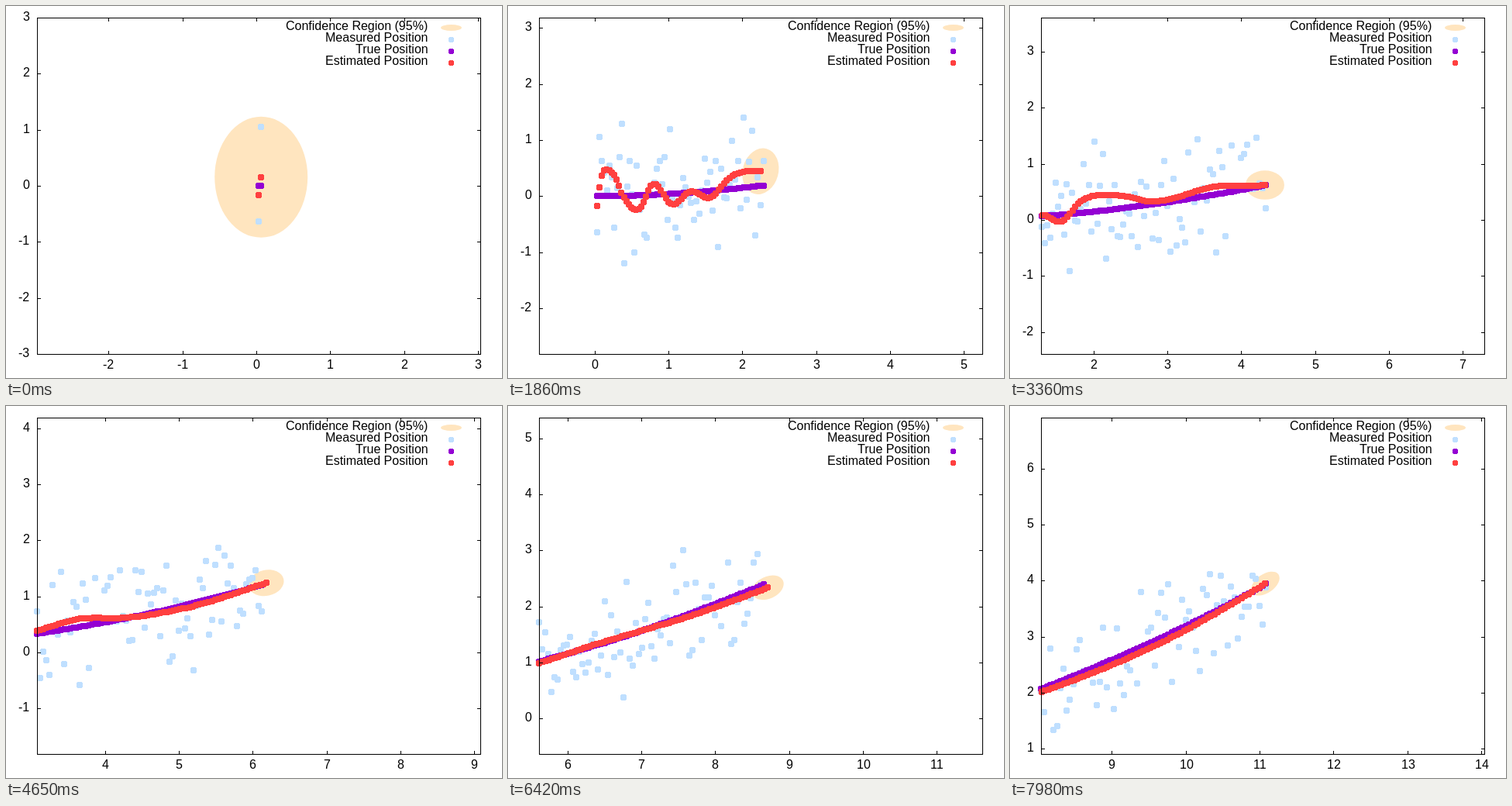
An HTML page with a canvas that plays this animation: 640 px wide and 480 px high, repeating every 8000 ms.

```html
<!DOCTYPE html>
<html lang="en">
<head>
<meta charset="utf-8">
<title>Position tracking</title>
<style>
  html, body { margin: 0; width: 100%; height: 100%; overflow: hidden; background: #fff; }
  canvas { display: block; }
</style>
</head>
<body>
<canvas id="plot" width="640" height="480"></canvas>
<script>
const ctx = document.getElementById('plot').getContext('2d');
const LOOP = 8000, STEP = 30, SAMPLES = 268;
const BOX = { left: 40, right: 612, top: 15, bottom: 449 };
const MID = { x: 326, y: 232 };
const UNIT = { x: 572 / 6, y: 434 / 6 };
const COLOR = { region: '#ffe5bf', measured: '#bfdfff', truth: '#9400d3', estimate: '#ff4040' };

// Cubic Hermite curve through unevenly spaced [time, value] knots
function smooth(...knots) {
  const last = knots.length - 1;
  const rise = i => (knots[i + 1][1] - knots[i][1]) / (knots[i + 1][0] - knots[i][0]);
  const slopes = knots.map(([t], i) => {
    if (i === 0) return rise(0);
    if (i === last) return rise(last - 1);
    const before = t - knots[i - 1][0], after = knots[i + 1][0] - t;
    return (rise(i - 1) * after + rise(i) * before) / (before + after);
  });
  return t => {
    let i = 0;
    while (i < last - 1 && t >= knots[i + 1][0]) i++;
    const [t0, v0] = knots[i], [t1, v1] = knots[i + 1];
    const h = t1 - t0, u = (t - t0) / h, w = 1 - u;
    return v0 * (1 + 2 * u) * w * w + v1 * u * u * (3 - 2 * u)
      + h * u * w * (slopes[i] * w - slopes[i + 1] * u);
  };
}

const trueX = smooth([0, .03], [36, 1.269], [85, 3.163], [112, 4.29],
  [155, 6.08], [214, 8.615], [266, 11.043], [290, 12.18]);
const trueY = k => k * k * (4.8 + .72 * (k / 266) ** 3) / 1e5;

// The estimate swings around the truth and settles; it also runs some samples ahead or behind
const error = smooth([0, -.17], [1, .16], [6, .42], [11, -.05], [17, -.24], [22, .18],
  [30, -.19], [37, .02], [44, -.12], [51, .2], [65, .23], [75, .06], [98, .14],
  [112, .01], [130, -.05], [163, .02], [200, -.06], [236, -.09], [266, .01]);
const lead = smooth([0, 0], [36, -.7], [85, -1], [112, -.3], [155, 1.4], [214, 1.2], [266, -.2]);

const radius = k => 17 + 61 / (1 + k / 17);
const ratio = k => 1.3 + .4 * (k / 266) ** 3;
const tilt = smooth([0, 90], [36, 80], [85, 96], [112, 180], [155, 192], [214, 205], [266, 215]);

let seed = 20;
const random = () => (seed = (seed * 1664525 + 1013904223) % 4294967296) / 4294967296;
const gauss = () => (random() + random() + random() + random() - 2) * Math.sqrt(3);

const truth = [], measured = [], estimate = [];
for (let i = 0; i < SAMPLES; i++) {
  const x = trueX(i), y = trueY(i), s = i + lead(i);
  truth.push({ x, y });
  measured.push({ x, y: y + .5 * gauss() });
  estimate.push({ x: trueX(s), y: trueY(s) + error(s) });
}

// Square marker with its corner pixels cut off
function marker(x, y, size) {
  const left = x - (size >> 1), top = y - (size >> 1);
  ctx.fillRect(left, top + 1, size, size - 2);
  ctx.fillRect(left + 1, top, size - 2, size);
}

function ellipse(x, y, rx, ry, degrees = 0) {
  ctx.fillStyle = COLOR.region;
  ctx.beginPath();
  ctx.ellipse(x, y, rx, ry, -degrees * Math.PI / 180, 0, 2 * Math.PI);
  ctx.fill();
}

// Text starts on a whole pixel; align is the share of its width left of x
function label(text, x, y, align) {
  ctx.fillText(text, Math.floor(x - ctx.measureText(text).width * align), y);
}

function drawAxes(view) {
  const { left, right, top, bottom } = BOX;
  ctx.fillStyle = '#000';
  for (const y of [top, bottom]) ctx.fillRect(left, y, right - left + 1, 1);
  for (const x of [left, right]) ctx.fillRect(x, top, 1, bottom - top + 1);

  const lowest = c => Math.ceil(c - 3 - 1e-6);
  for (let n = lowest(view.x); n <= view.x + 3; n++) {
    const x = Math.round(MID.x + (n - view.x) * UNIT.x);
    ctx.fillRect(x, top, 1, 5);
    ctx.fillRect(x, bottom - 4, 1, 5);
    label(n, x + 1, 468, .5);
  }
  for (let n = lowest(view.y); n <= view.y + 3 + 1e-6; n++) {
    const y = Math.round(MID.y - (n - view.y) * UNIT.y);
    ctx.fillRect(left, y, 5, 1);
    ctx.fillRect(right - 4, y, 5, 1);
    label(n, 31, y + 4, 1);
  }
}

function drawLegend() {
  ctx.fillStyle = '#000';
  ['Confidence Region (95%)', 'Measured Position', 'True Position', 'Estimated Position']
    .forEach((text, row) => label(text, 545, 31 + 15 * row, 1));
  ellipse(574.5, 28, 13.5, 4);
  [COLOR.measured, COLOR.truth, COLOR.estimate].forEach((color, row) => {
    ctx.fillStyle = color;
    marker(574, 43 + 15 * row, 7);
  });
}

function draw(k) {
  const view = truth[k], newest = k + 1;
  const project = p => [MID.x + (p.x - view.x) * UNIT.x, MID.y - (p.y - view.y) * UNIT.y];

  ctx.fillStyle = '#fff';
  ctx.fillRect(0, 0, 640, 480);
  ctx.font = '16px "Liberation Sans", Arial, sans-serif';

  const r = radius(k);
  ellipse(...project(estimate[newest]), r, r / ratio(k), tilt(k));

  for (const [points, color] of [
    [measured, COLOR.measured], [truth, COLOR.truth], [estimate, COLOR.estimate]]) {
    ctx.fillStyle = color;
    for (const point of points.slice(0, newest + 1)) {
      const [x, y] = project(point).map(Math.round);
      if (x >= BOX.left && y >= BOX.top && y <= BOX.bottom) marker(x, y, 8);
    }
  }
  drawAxes(view);
  drawLegend();
}

const start = performance.now();
let shown = -1;
function tick() {
  const k = Math.floor((performance.now() - start) % LOOP / STEP);
  if (k !== shown) draw(shown = k);
  requestAnimationFrame(tick);
}
tick();
</script>
</body>
</html>
```
